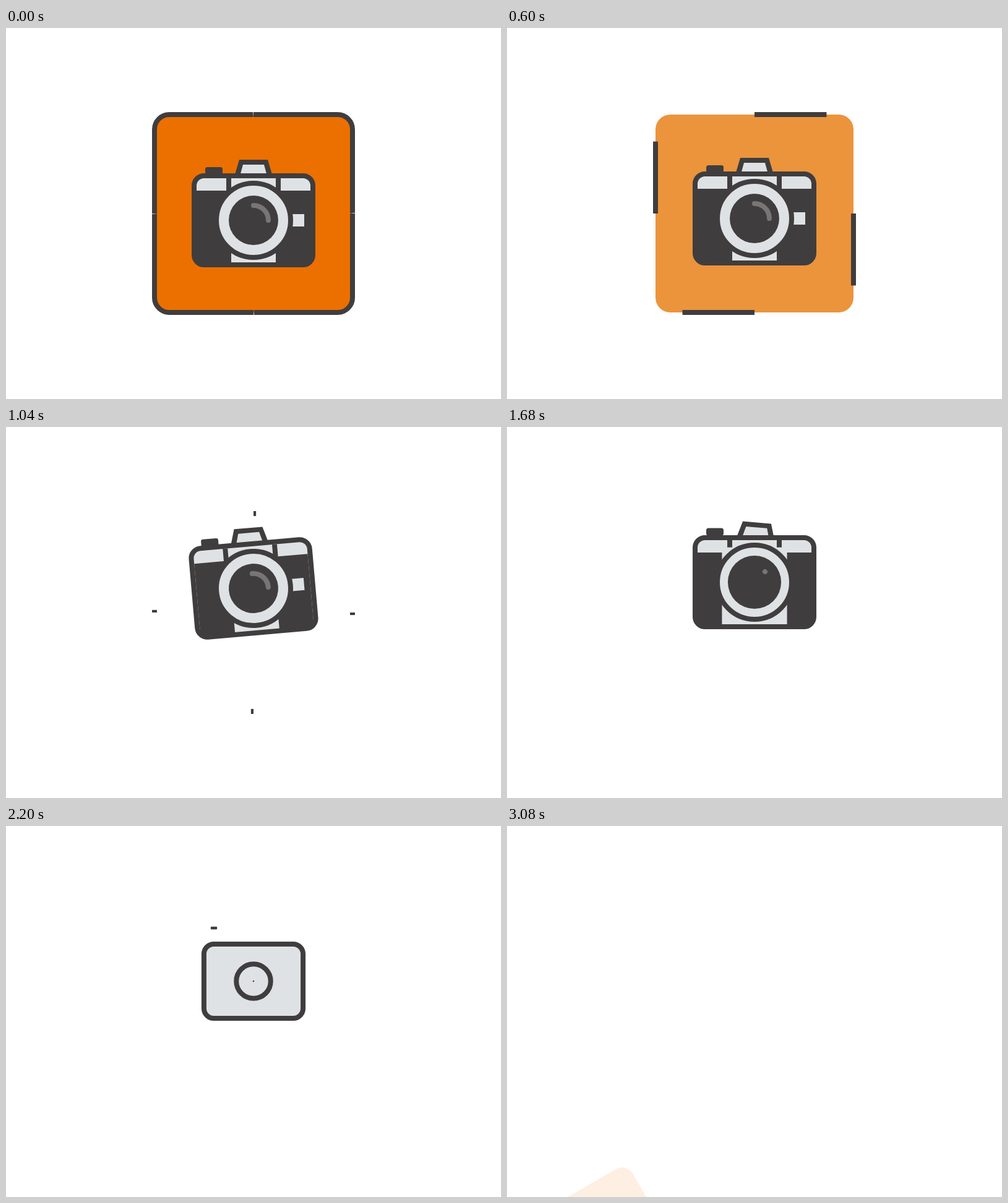
An HTML page with a canvas for the animation above (3120 ms loop, 800x600 px).

```html
<!DOCTYPE html>
<html lang="en">
<head>
<meta charset="utf-8">
<title>Camera icon</title>
<style>
html, body { margin: 0; width: 100%; height: 100%; overflow: hidden; background: #fff; }
canvas { display: block; }
</style>
</head>
<body>
<canvas id="stage" width="800" height="600"></canvas>
<script>
const ctx = document.getElementById('stage').getContext('2d');
const LOOP = 3120, STEP = 40;
const DARK = '#403d3e', LIGHT = '#dfe2e4', GLINT = '#777576';
const TAU = Math.PI * 2;

const clamp = v => Math.max(0, Math.min(1, v));
const part = (t, start, dur) => clamp((t - start) / dur);

// cubic-bezier(.455, .03, .515, .955), solved by bisection
function ease(t, start, dur) {
  const x = part(t, start, dur);
  if (x === 0 || x === 1) return x;
  const curve = (u, a, b) => 3 * (1 - u) * (1 - u) * u * a + 3 * (1 - u) * u * u * b + u * u * u;
  let lo = 0, hi = 1;
  for (let i = 0; i < 24; i++) {
    const mid = (lo + hi) / 2;
    if (curve(mid, 0.455, 0.515) < x) lo = mid; else hi = mid;
  }
  return curve(lo, 0.03, 0.955);
}

// Scale from 1 to 0 that swells a little first
function shrink(t, start, dur) {
  const p = part(t, start, dur);
  return Math.max(0, 1 - 2.70158 * p ** 3 + 1.70158 * p ** 2);
}

function fillRound(x, y, w, h, r, color) {
  ctx.beginPath();
  ctx.roundRect(x, y, w, h, r);
  ctx.fillStyle = color;
  ctx.fill();
}

function disc(r, color) {
  ctx.beginPath();
  ctx.arc(0, 0, r, 0, TAU);
  ctx.fillStyle = color;
  ctx.fill();
}

function polygon(points, color) {
  ctx.beginPath();
  points.forEach(([x, y]) => ctx.lineTo(x, y));
  ctx.closePath();
  ctx.fillStyle = color;
  ctx.fill();
}

function stroke(width, color) {
  ctx.lineWidth = width;
  ctx.strokeStyle = color;
  ctx.stroke();
}

const tileStops = [
  [470, 235, 112, 0], [600, 235, 148, 60], [760, 228, 187, 133], [1030, 255, 255, 255]
];

function tileColor(t) {
  let i = 0;
  while (i < tileStops.length - 2 && t > tileStops[i + 1][0]) i++;
  const a = tileStops[i], b = tileStops[i + 1];
  const p = part(t, a[0], b[0] - a[0]);
  return `rgb(${[1, 2, 3].map(n => Math.round(a[n] + (b[n] - a[n]) * p))})`;
}

function drawTile(t) {
  if (t < 1030) fillRound(240, 140, 320, 320, 24, tileColor(t));
}

function drawBorder(t) {
  const len = 312 * (1 - ease(t, -76, 1200));
  if (len <= 0) return;
  ctx.save();
  ctx.translate(400, 300);
  ctx.setLineDash([len, 999]);
  for (let i = 0; i < 4; i++) {
    ctx.beginPath();
    ctx.moveTo(0, -160);
    ctx.arcTo(160, -160, 160, 0, 24);
    ctx.lineTo(160, 0);
    stroke(8, DARK);
    ctx.rotate(Math.PI / 2);
  }
  ctx.restore();
}

// Height above the resting place: a small hop, then the rise
function lift(t) {
  if (t < 516) return 0;
  if (t < 756) return 3.3 * (1 - ((t - 636) / 120) ** 2);
  if (t < 1236) return 60 * (1 - ((1236 - t) / 480) ** 2);
  return 60;
}

function drawHump(t) {
  const drop = ease(t, 1600, 380);
  if (drop === 1) return;
  const tilt = 5 * part(t, 1600, 80);
  ctx.save();
  ctx.translate(0, -52 + 30 * drop - 1.5 * part(t, 1600, 80));
  ctx.rotate(tilt * Math.PI / 180);
  polygon([[-23, -46], [23, -46], [33, -12], [-33, -12]], DARK);
  polygon([[-17, -38], [17, -38], [23, -16], [-23, -16]], LIGHT);
  ctx.restore();
}

function drawButton(t) {
  const k = shrink(t, 1690, 560);
  if (k <= 0) return;
  ctx.save();
  ctx.translate(-64, -80 - 6 * ease(t, 1580, 290));
  ctx.scale(k, k);
  fillRound(-14, -6, 28, 12, 3.5, DARK);
  ctx.restore();
}

function drawBody(t) {
  if (t >= 2760) return;
  const k = 1 - ease(t, 1974, 800);
  const w = 192 * k, h = 144 * k;
  const r = Math.min(16, h / 2);
  const outline = () => {
    ctx.beginPath();
    ctx.roundRect(-w / 2, -h / 2, w, h, r);
  };

  outline();
  ctx.fillStyle = LIGHT;
  ctx.fill();

  ctx.save();
  ctx.clip();
  const panel = 56 * (1 - ease(t, 1440, 640));
  const bar = 24 * (1 - ease(t, 1480, 400));
  ctx.fillStyle = DARK;
  for (const side of [-1, 1]) {
    if (panel > 0) ctx.fillRect(side * 92, -48, -side * panel, 120);
    ctx.fillRect(side * 40 - 4, -68, 8, bar);
  }
  ctx.restore();

  outline();
  stroke(8, DARK);
}

function drawMark(t) {
  const size = 20 * shrink(t, 1120, 480);
  ctx.fillStyle = LIGHT;
  ctx.fillRect(72 - size / 2, -size / 2, size, size);
}

function drawLens(t) {
  const rim = 60 * (1 - ease(t, 1790, 800));
  if (rim > 0) {
    ctx.beginPath();
    ctx.arc(0, 0, rim, 0, TAU);
    ctx.fillStyle = LIGHT;
    ctx.fill();
    stroke(8, DARK);
  }
  const glass = 40 * shrink(t, 1465, 740);
  if (glass > 0) disc(glass, DARK);
  if (t < 1700) {
    const half = Math.PI / 4 * (1 - ease(t, 1240, 440)) + 0.001;
    ctx.beginPath();
    ctx.arc(0, 0, 24, -Math.PI / 4 - half, -Math.PI / 4 + half);
    ctx.lineCap = 'round';
    stroke(8, GLINT);
    ctx.lineCap = 'butt';
  }
}

function drawCamera(t) {
  ctx.save();
  ctx.translate(400, 311 - lift(t));
  ctx.rotate(-5.2 * Math.sin(Math.PI * part(t, 756, 480)) * Math.PI / 180);
  drawHump(t);
  drawButton(t);
  drawBody(t);
  drawMark(t);
  drawLens(t);
  ctx.restore();
}

// Pale card rising from the lower left
function drawCard(t) {
  if (t < 2920) return;
  const left = (3080 - t) / 160;
  ctx.save();
  ctx.translate(193.3 - 22 * left, 545 + 46 * left);
  ctx.rotate(-Math.PI / 6);
  fillRound(-267, 0, 267, 267, 20, `rgba(235, 112, 0, ${0.115 - 0.09 * left})`);
  ctx.restore();
}

function draw(t) {
  ctx.fillStyle = '#fff';
  ctx.fillRect(0, 0, 800, 600);
  drawTile(t);
  drawBorder(t);
  drawCamera(t);
  drawCard(t);
}

const begin = performance.now();
function tick() {
  const now = (performance.now() - begin) % LOOP;
  draw(Math.floor(now / STEP) * STEP);
  requestAnimationFrame(tick);
}
tick();
</script>
</body>
</html>
```
